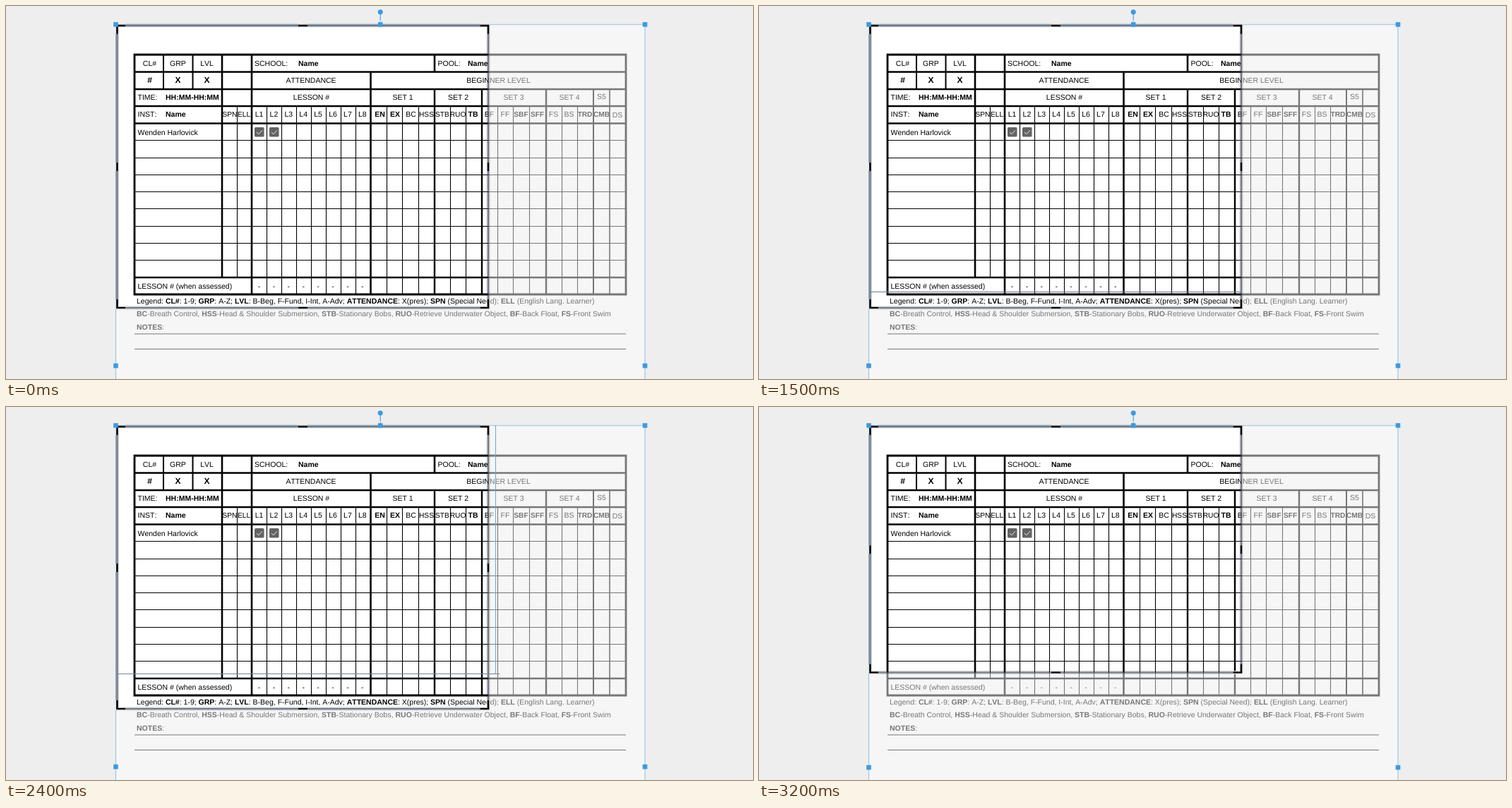
Write an HTML page that moves like this. It is 1058 px wide and 529 px high and loops after 4 s.

```html
<!DOCTYPE html>
<html lang="en">
<head>
<meta charset="utf-8">
<title>Cropping a class sheet</title>
<style>
  html, body { margin: 0; width: 100%; height: 100%; overflow: hidden; background: #eee; }
  svg { display: block; width: 100vw; height: 100vh; }
  text {
    font: 10.5px "Liberation Sans", Arial, sans-serif;
    font-kerning: none;
    text-rendering: geometricPrecision;
    white-space: pre;
  }
  .b { font-weight: bold; }
  .s { font-size: 10.2px; }
  .m { text-anchor: middle; }
  .big { font-size: 12px; }
</style>
</head>
<body>
<svg id="stage" viewBox="0 0 1058 529" preserveAspectRatio="none">
  <rect x="156" y="26" width="749" height="510" fill="#fff"/>
  <g id="sheet"></g>
  <g id="outline"></g>
  <g id="before"></g>
  <g id="after"></g>
  <path id="drag" d="M157 .5H684" stroke="#6f7887" stroke-width="1" opacity="0"/>
  <g id="guide" fill="none" stroke-width="1" opacity="0">
    <path d="M157 378.5H699" stroke="#71859c"/>
    <path d="M693.5 26V378" stroke="#62a9dc"/>
  </g>
  <g id="knobs"></g>
</svg>
<script>
const LOOP = 4000;
const BLUE = '#3d9ade';
const $ = id => document.getElementById(id);

function add(parent, tag, attrs, text) {
  const el = document.createElementNS('http://www.w3.org/2000/svg', tag);
  for (const k in attrs) el.setAttribute(k, attrs[k]);
  if (text) el.textContent = text;
  parent.append(el);
  return el;
}

const sheet = $('sheet');
const label = (x, y, text, cls = '') => add(sheet, 'text', { x, y: y + 3.8, class: cls }, text);
const mid = (x, y, text, cls = '') => label(x, y, text, 'm ' + cls);
const rule = (d, w) => add(sheet, 'path', { d, stroke: '#000', 'stroke-width': w, fill: 'none' });
const columns = (xs, y1, y2, w) => rule(xs.map(x => `M${x} ${y1}V${y2}`).join(''), w);

// Text where *stars* mark bold runs.
function rich(x, y, source) {
  const line = label(x, y, '');
  source.split('*').forEach((part, i) => part && add(line, 'tspan', i % 2 ? { class: 'b' } : {}, part));
}

function drawGrid() {
  const lessons = Array.from({ length: 7 }, (_, i) => 369.5 + i * 21);
  const rows = Array.from({ length: 8 }, (_, i) => Math.floor(190.8 + i * 24.28) + .5);
  rule(rows.map(y => `M182 ${y}H878`).join(''), 1.1);
  columns([327.5], 142, 385, 1.1);
  columns([...lessons, 539.5, 561.5, 584.5, 629.5, 651.5, 696.5, 718.5, 741.5, 787.5, 809.5], 142, 409, 1.1);
  columns([855], 118, 409, 1.6);
  rule([93.5, 118, 142, 166.5, 385].map(y => `M182 ${y}H878`).join(''), 2.6);
  rule('M182 69H878V409H182Z', 2.8);
  columns([223, 264.5], 69, 118, 2);
  columns([306], 69, 385, 2.6);
  columns([348], 69, 409, 2.6);
  columns([516.5], 94, 409, 2.6);
  columns([607], 69, 94, 2.6);
  columns([607, 674, 765], 118, 409, 2.4);
  columns([832], 118, 409, 2);
  rule('M182 465H878M182 486.5H878', 1.1);
}

function drawText() {
  ['CL#', 'GRP', 'LVL'].forEach((s, i) => {
    const x = [203.5, 243.5, 284.5][i];
    mid(x, 81, s);
    mid(x, 105, i ? 'X' : '#', 'b big');
  });
  label(352, 81, 'SCHOOL:');
  label(414, 81, 'Name', 'b');
  label(611.5, 81, 'POOL:');
  label(654, 81, 'Name', 'b');
  mid(432, 105, 'ATTENDANCE');
  mid(697.5, 105, 'BEGINNER LEVEL');
  label(186.5, 129.5, 'TIME:');
  label(226, 129.5, 'HH:MM-HH:MM', 'b');
  mid(432.5, 129.5, 'LESSON #');
  [562, 640.5, 719, 798].forEach((x, i) => mid(x, 129.5, 'SET ' + (i + 1)));
  mid(843.5, 128.5, 'S5');
  label(186.5, 153.5, 'INST:');
  label(226, 153.5, 'Name', 'b');

  mid(317, 153.5, 'SPN', 's');
  mid(337, 153.5, 'ELL', 's');
  for (let i = 0; i < 8; i++) {
    const x = 358.5 + i * 20.9;
    mid(x, 153.5, 'L' + (i + 1));
    mid(x, 397.5, '-');
  }
  const skills = 'EN* EX* BC HSS STB RUO TB* BF FF SBF* SFF* FS BS TRD* CMB* DS'.split(' ');
  const at = [529.5, 551, 573.5, 595.5, 618, 640, 661.5, 684.5, 707, 729.5, 752.5, 775.5, 797.5, 820, 843.5, 866];
  skills.forEach((s, i) => {
    const name = s.replace('*', '');
    mid(at[i], name === 'DS' ? 154.5 : 153.5, name, (name === s ? '' : 'b ') + (name.length > 2 ? 's' : ''));
  });

  label(186.5, 179, 'Wenden Harlovick');
  [352, 373].forEach(x => {
    add(sheet, 'rect', { x, y: 172, width: 13.5, height: 13.5, rx: 1.5, fill: '#636365' });
    add(sheet, 'path', { d: `M${x + 3} 179l2.8 2.8l5-5.4`, fill: 'none', stroke: '#fff', 'stroke-width': .9 });
  });
  label(186.5, 397.5, 'LESSON # (when assessed)');
  rich(185, 418.5, 'Legend: *CL#*: 1-9; *GRP*: A-Z; *LVL*: B-Beg, F-Fund, I-Int, A-Adv; *ATTENDANCE*: X(pres); *SPN* (Special Need); *ELL* (English Lang. Learner)');
  rich(185, 436.5, '*BC*-Breath Control, *HSS*-Head & Shoulder Submersion, *STB*-Stationary Bobs, *RUO*-Retrieve Underwater Object, *BF*-Back Float, *FS*-Front Swim');
  rich(185, 455, '*NOTES*:');
}

// Faded page outside the crop, its soft edge and the black grips.
function drawCrop(g, bottom) {
  const l = 157.5, r = 683, t = 27.8, cx = 420.5, cy = (t + bottom) / 2;
  const box = `M${l} ${t}H${r}V${bottom}H${l}Z`;
  add(g, 'path', { d: 'M150 20H912V536H150Z' + box, fill: '#eee', 'fill-opacity': .5, 'fill-rule': 'evenodd' });
  const line = (d, stroke, w, opacity = 1) =>
    add(g, 'path', { d, stroke, 'stroke-width': w, opacity, fill: 'none' });
  line(box, '#2c3344', 5, .22);
  line(box, '#2c3344', 2.2, .55);
  const grips = [[l, t, 1, 1], [r, t, -1, 1], [l, bottom, 1, -1], [r, bottom, -1, -1]]
    .map(([x, y, dx, dy]) => `M${x + 11.5 * dx} ${y}H${x}V${y + 12 * dy}`).join('') +
    [t, bottom].map(y => `M${cx - 6.5} ${y}h13`).join('') +
    [l, r].map(x => `M${x} ${cy - 6}v12`).join('');
  line(grips, '#fff', 4.4, .9);
  line(grips, '#000', 2.7);
}

function drawSelection() {
  add($('outline'), 'path', {
    d: 'M155.5 536V26.2H905V536M530.2 8V26', fill: 'none', stroke: BLUE, 'stroke-width': 1.1
  });
  const g = $('knobs');
  const knob = (parent, x, y) =>
    add(parent, 'rect', { x: x - 3.3, y: y - 3.3, width: 6.6, height: 6.6, fill: BLUE });
  [155.5, 530.2, 905].forEach(x => knob(g, x, 26.2));
  add(g, 'circle', { cx: 530.2, cy: 8.4, r: 3.5, fill: BLUE });
  const low = add(g, 'g', { id: 'low' });
  [155.5, 905].forEach(x => knob(low, x, 510.2));
}

// Rows of [ms, style]; each pose holds until the next.
function play(id, rows) {
  const frames = rows.map(([ms, style]) => ({ offset: ms / LOOP, easing: 'step-end', ...style }));
  frames.push({ ...rows[rows.length - 1][1], offset: 1 });
  $(id).animate(frames, { duration: LOOP, iterations: Infinity });
}

drawGrid();
drawText();
drawCrop($('before'), 428);
drawCrop($('after'), 376.5);
drawSelection();

const COMMIT = 2900;
const show = { opacity: 1 }, hide = { opacity: 0 };
const lineAt = y => ({ opacity: 1, transform: `translateY(${y}px)` });
play('before', [[0, show], [COMMIT, hide]]);
play('after', [[0, hide], [COMMIT, show]]);
play('drag', [
  [0, { opacity: 0, transform: 'translateY(421px)' }],
  [1200, lineAt(421)], [1300, lineAt(420)], [1400, lineAt(414)],
  [1500, lineAt(405)], [1600, lineAt(397)], [1700, lineAt(384)],
  [1800, { opacity: 0, transform: 'translateY(378px)' }]
]);
play('guide', [[0, hide], [1800, show], [COMMIT, hide]]);
play('low', [[0, { transform: 'translateY(0px)' }], [COMMIT, { transform: 'translateY(1px)' }]]);
</script>
</body>
</html>
```
